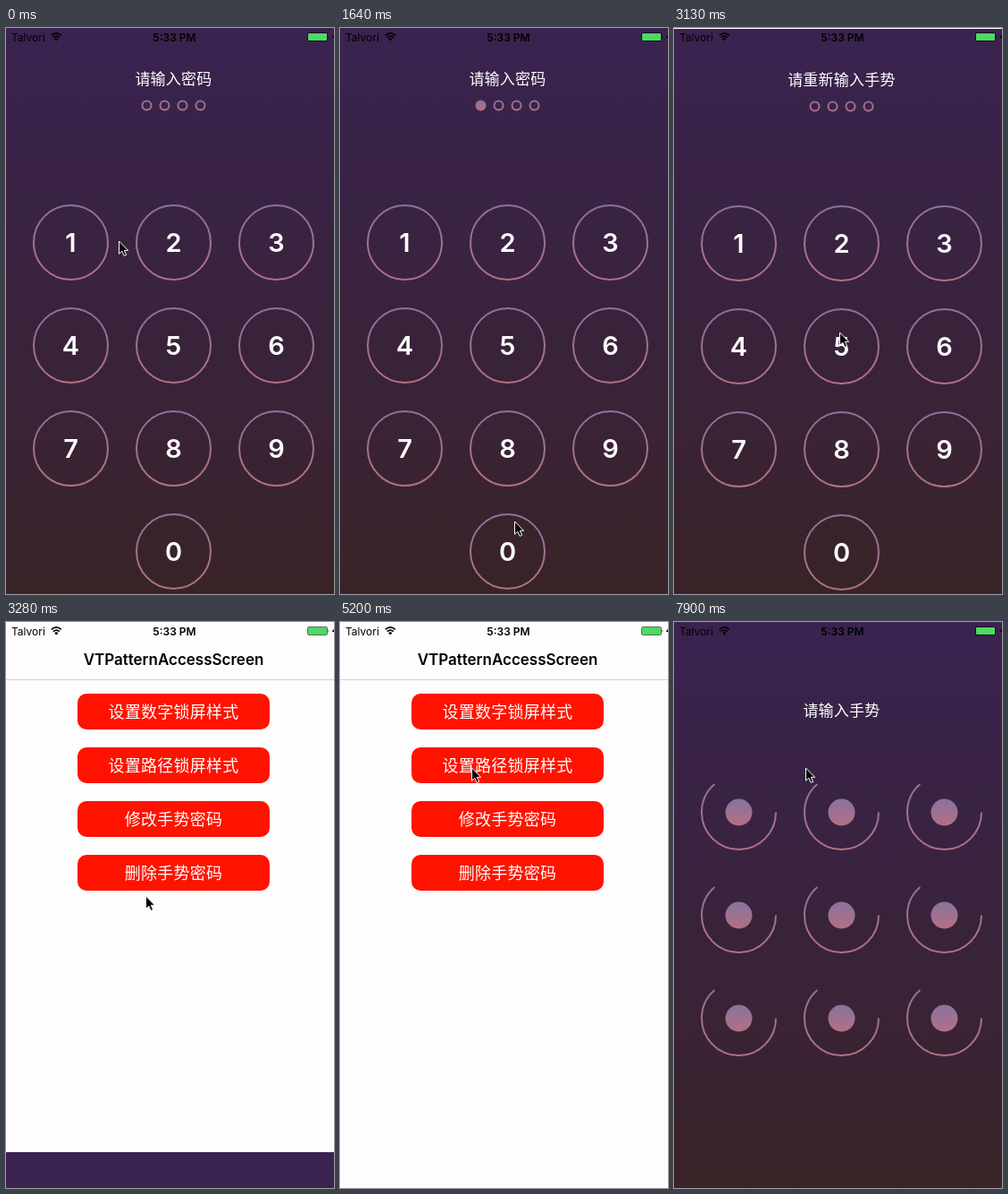
Write an HTML page that moves like this. It is 367 by 632 pixels and loops after 8 s.

```html
<!DOCTYPE html>
<html lang="zh-CN">
<head>
<meta charset="utf-8">
<title>Lock screen</title>
<style>
  html, body { margin: 0; width: 100%; height: 100%; overflow: hidden; background: #fdfdfd; }
  svg { display: block; width: 367px; height: 632px; }
  text { font-family: Inter, Roboto, sans-serif; text-anchor: middle; }
  .cjk {
    font-family: "Noto Sans CJK SC", "Noto Sans CJK", sans-serif;
    font-weight: 350; letter-spacing: .25px; fill: #fff;
  }
  .head { font-size: 17px; }
  .label { font-size: 18px; }
  .digit { font-size: 29px; font-weight: 600; fill: #fff; }
  .ring { fill: none; stroke: url(#tint); stroke-width: 2; }
</style>
</head>
<body>
<svg viewBox="0 0 367 632" xmlns="http://www.w3.org/2000/svg">
  <defs>
    <linearGradient id="night" x1="0" y1="0" x2="0" y2="1">
      <stop offset="0" stop-color="#3a2350"/>
      <stop offset=".4" stop-color="#392340"/>
      <stop offset=".78" stop-color="#392332"/>
      <stop offset="1" stop-color="#382426"/>
    </linearGradient>
    <linearGradient id="tint" x1="0" y1="0" x2="0" y2="1">
      <stop offset="0" stop-color="#89739e"/>
      <stop offset="1" stop-color="#b47083"/>
    </linearGradient>
  </defs>

  <g id="menu">
    <rect width="367" height="632" fill="#fdfdfd"/>
    <rect y="64" width="367" height="1" fill="#cfcfcf"/>
    <text x="187.5" y="48" font-size="17" font-weight="600">VTPatternAccessScreen</text>
  </g>
  <g id="pin">
    <rect width="367" height="632" fill="url(#night)"/>
    <text id="prompt" class="cjk head" x="187.5" y="63"></text>
  </g>
  <g id="pattern">
    <rect width="367" height="632" fill="url(#night)"/>
    <text class="cjk head" x="187.5" y="104.5">请输入手势</text>
  </g>

  <g id="status">
    <text x="6" y="14.5" font-size="12" style="text-anchor:start">Talvori</text>
    <g fill="none" stroke="#000" stroke-width="1.7">
      <path d="M50.8 8.4Q56.3 3.4 61.8 8.4"/>
      <path d="M52.8 10.7Q56.3 7.5 59.8 10.7"/>
    </g>
    <path d="M54.2 12.2Q56.3 10.4 58.4 12.2L56.3 14.4Z"/>
    <text x="188.5" y="14.5" font-size="12" font-weight="600">5:33 PM</text>
    <rect x="337.5" y="5.5" width="22" height="9" rx="1.5" fill="none" stroke="#000" stroke-opacity=".6"/>
    <rect x="338" y="6" width="21" height="8" rx="1" fill="#4cd964"/>
    <path d="M360.6 8.5q1.6 1.5 0 3z"/>
    <path d="M367 7.5L364.6 11H367Z"/>
  </g>
  <path id="cursor" d="M.5 1V15.2L3.8 12.2 6.2 17.4 8.7 16.3 6.3 11.3H10.6Z" stroke="#fff" stroke-linejoin="round"/>
</svg>
<script>
const LOOP = 8000;
const BEAT = 148.2; // the picture only changes on a beat
const $ = id => document.getElementById(id);

function add(parent, tag, attrs, text = '') {
  const el = document.createElementNS('http://www.w3.org/2000/svg', tag);
  for (const k in attrs) el.setAttribute(k, attrs[k]);
  el.textContent = text;
  parent.append(el);
  return el;
}

const column = i => 72.5 + 115 * (i % 3);
const row = i => 115 * Math.floor(i / 3);

['设置数字锁屏样式', '设置路径锁屏样式', '修改手势密码', '删除手势密码'].forEach((label, i) => {
  const y = 80 + 60 * i;
  add($('menu'), 'rect', { x: 80, y, width: 215, height: 40, rx: 10, fill: '#ff1300' });
  add($('menu'), 'text', { class: 'cjk label', x: 187.5, y: y + 26.7 }, label);
});

const dots = Array.from({ length: 4 }, (_, i) =>
  add($('pin'), 'circle', { class: 'ring', cx: 157.5 + 20 * i, cy: 86.5, r: 5 }));

const keys = Array.from({ length: 10 }, (_, n) => {
  const slot = n ? n - 1 : 10;
  const cx = column(slot), cy = 239.5 + row(slot);
  const key = add($('pin'), 'circle', { class: 'ring', cx, cy, r: 41.5 });
  add($('pin'), 'text', { class: 'digit', x: cx, y: cy + 10.7 }, n);
  return key;
});

const arcs = Array.from({ length: 9 }, (_, i) => {
  const cx = column(i), cy = 212.5 + row(i);
  add($('pattern'), 'circle', { cx, cy, r: 15, fill: 'url(#tint)' });
  return add($('pattern'), 'circle', { class: 'ring', cx, cy, r: 41.5, pathLength: 360 });
});

// All times below are in beats.
const CLOSE = 21, CLOSED = 24, OPEN = 50;
const taps = [
  { key: 1, down: 5, up: 7 },
  { key: 0, down: 12, up: 13 },
  { key: 6, down: 15, up: 16 },
  { key: 5, down: 18, up: 19 }
];
const home = [126, 237];
const moves = [
  { from: 0, till: 2, to: [79, 237] },
  { from: 7, till: 11, to: [195, 550] },
  { from: 12, till: 15, to: [273, 385] },
  { from: 16, till: 18, to: [185, 339] },
  { from: 21, till: 22, to: [156, 305] },
  { from: 22, till: 24, to: [100, 270] },
  { from: 26, till: 28, to: [133, 191] },
  { from: 29, till: 30, to: [130, 181] },
  { from: 32, till: 35, to: [147, 162] }
];

const clamp = p => Math.min(1, Math.max(0, p));
const ease = p => p * p * (3 - 2 * p);
const show = (el, on) => el.setAttribute('display', on ? 'inline' : 'none');
const paint = (el, on) => el.style.fill = on ? 'url(#tint)' : 'none';

function pointer(beat) {
  return moves.reduce((pos, { from, till, to }) => {
    const p = ease(clamp((beat - from) / (till - from)));
    return pos.map((v, i) => v + (to[i] - v) * p);
  }, home).map(Math.round);
}

function draw(t) {
  const beat = Math.floor(t / BEAT);
  $('cursor').setAttribute('transform', `translate(${pointer(beat)})`);

  const held = taps.find(tap => tap.down <= beat && beat < tap.up);
  keys.forEach((key, n) => paint(key, held?.key === n));

  const typed = taps.filter(tap => tap.up <= beat).length;
  const done = typed === taps.length;
  dots.forEach((dot, i) => paint(dot, !done && i < typed));
  $('prompt').textContent = done ? '请重新输入手势' : '请输入密码';

  const drop = beat < CLOSE ? 0 : Math.floor(1 + 631 * (1 - 16 ** (CLOSE - beat)));
  show($('pin'), beat < CLOSED);
  $('pin').setAttribute('transform', `translate(0 ${drop})`);

  const sweep = 76.4 * (beat - OPEN);
  show($('pattern'), beat >= OPEN);
  arcs.forEach(arc => {
    show(arc, sweep > 0);
    arc.setAttribute('stroke-dasharray', `${Math.max(0, sweep)} 360`);
  });
}

const start = performance.now();
function tick() {
  draw((performance.now() - start) % LOOP);
  requestAnimationFrame(tick);
}
tick();
</script>
</body>
</html>
```
